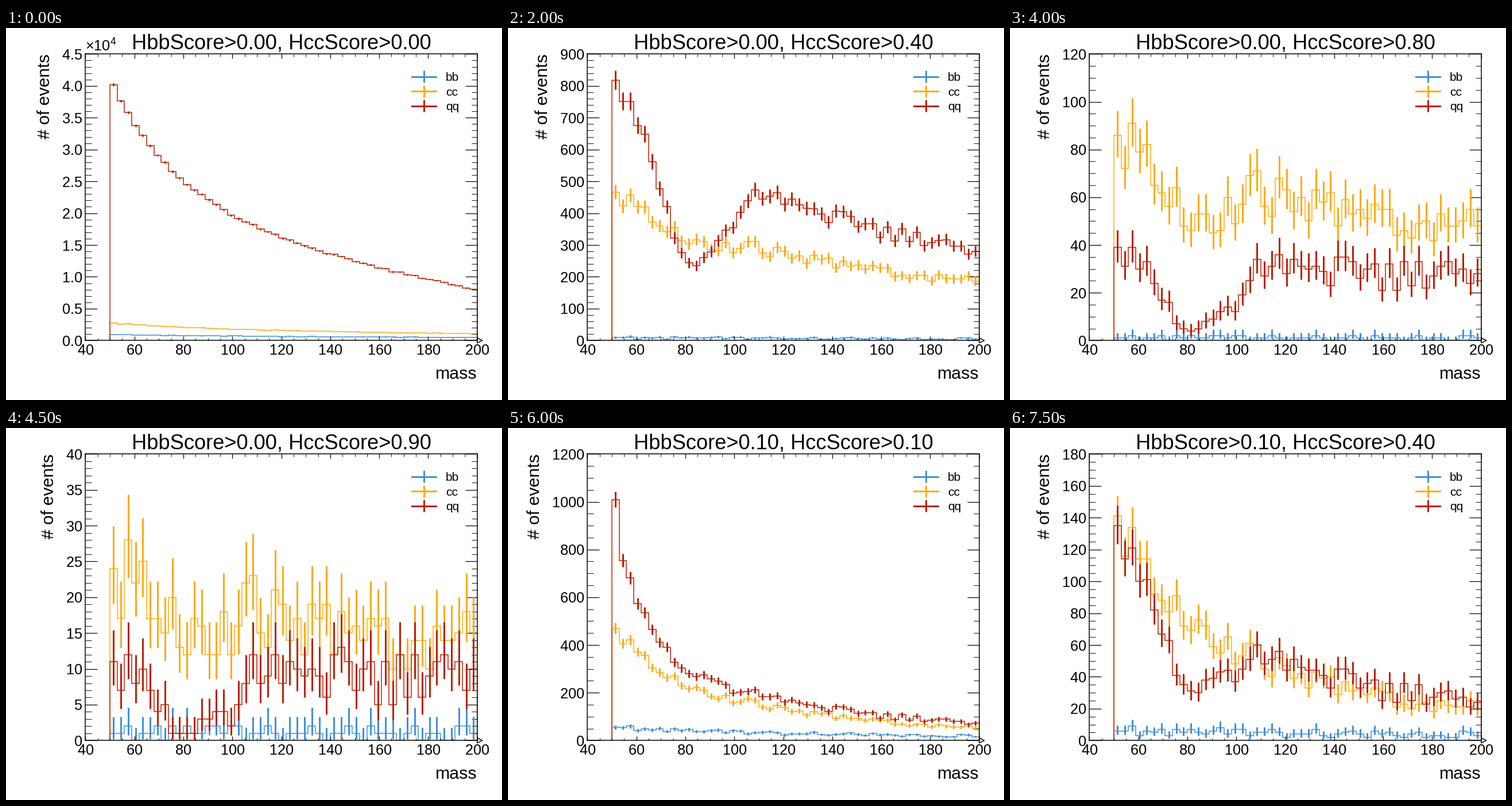
Recreate the animation shown at these times as a matplotlib script. Size 864 px wide and 648 px high, loop 8000 ms.

```python
import numpy as np
import matplotlib.pyplot as plt
from matplotlib.animation import FuncAnimation
from matplotlib.lines import Line2D
from matplotlib.patches import Polygon
from matplotlib.ticker import MaxNLocator, MultipleLocator
from matplotlib.transforms import IdentityTransform

W, H, DPI = 864, 648, 108
NBINS = 50
STEPS = 16
EDGES = np.linspace(50, 200, NBINS + 1)
MIDS = (EDGES[1:] + EDGES[:-1]) / 2
COLORS = {"bb": "#3f90da", "cc": "#ffa90e", "qq": "#bd1f01"}

plt.rcParams.update({
    "font.family": "Liberation Sans", "font.size": 14,
    "mathtext.fontset": "custom", "mathtext.rm": "Liberation Sans",
    "mathtext.default": "regular",
    "axes.labelsize": "x-large", "axes.titlesize": "xx-large",
    "axes.labelpad": 10, "axes.linewidth": 1,
    "axes.formatter.limits": [-2, 4], "axes.formatter.use_mathtext": True,
    "xtick.labelsize": "large", "ytick.labelsize": "large",
    "xtick.direction": "in", "ytick.direction": "in",
    "xtick.top": True, "ytick.right": True,
    "xtick.minor.visible": True, "ytick.minor.visible": True,
    "xtick.major.size": 5, "xtick.minor.size": 3,
    "ytick.major.size": 14, "ytick.minor.size": 7,
})

# Mass spectrum: a power law with a late cutoff, and a dip the cuts carve out.
LOG_MASS = np.log(MIDS / MIDS[0])
FALL = 1.07 * LOG_MASS + 0.0156 * LOG_MASS ** 8
DIP = np.exp(-0.5 * ((MIDS - 84.2) / 10.2) ** 2)

# (first-bin content, slope, power of the fall, dip depth) at each known cut
OPEN = {
    "bb": {0: (950, 0.45, 1, 0), 0.4: (9, 0.4, 1, 0), 0.8: (1, 0.1, 1, 0)},
    "cc": {0: (2750, 0.6, 1, 0), 0.4: (466, 0.58, 1, 0.15),
           0.6: (237, 0.5, 1, 0.25), 0.8: (86, 0.38, 1, 0.45), 0.9: (24, 0.35, 1, 0.5)},
    "qq": {0: (40200, 1, 1, 0), 0.4: (822, 0.69, 1, 0.87),
           0.6: (229, 0.48, 1, 1.25), 0.8: (39, 0.28, 1, 1.9), 0.9: (11, 0.2, 1, 2)},
}
TIGHT = {
    "bb": {0: (480, 0.6, 1, 0), 0.1: (55, 0.7, 1, 0), 0.4: (6, 0.4, 1, 0)},
    "cc": {0: (750, 1.4, 1, 0), 0.1: (470, 1.38, 1, 0.1), 0.4: (141, 1.25, 1, 0.1)},
    "qq": {0: (1600, 1.9, 0.72, 0), 0.1: (1010, 1.92, 0.72, 0.1), 0.4: (136, 1.15, 1, 0.85)},
}

# One scatter per class, as tighter cuts keep part of the same events.
SCATTER = np.random.default_rng(4).uniform(-1.4, 1.4, (len(COLORS), NBINS))
SCATTER[:, 0] = 0
SCATTER = dict(zip(COLORS, SCATTER))


def counts(k, name):
    """Bin contents of one class at step k of the scan."""
    cut = k % 11 / 10
    if cut == 1:
        return np.zeros(NBINS)
    keys = (TIGHT if k > 10 else OPEN)[name]
    warped = np.power(list(keys), 0.45)
    first, slope, power, depth = np.transpose(list(keys.values()))

    def at_cut(values):
        return np.interp(cut ** 0.45, warped, values)

    mean = np.exp(at_cut(np.log(first)) - at_cut(slope) * FALL ** at_cut(power)
                  - at_cut(depth) * DIP)
    return np.maximum(np.round(mean + SCATTER[name] * np.sqrt(mean)), 0)


def poisson_errors(n):
    m = np.maximum(n, 1)
    low = np.where(n > 0, m * (1 - 1 / (9 * m) - 1 / (3 * np.sqrt(m))) ** 3, 0)
    u = n + 1
    high = u * (1 - 1 / (9 * u) + 1 / (3 * np.sqrt(u))) ** 3
    return np.array([n - low, high - n])


fig = plt.figure(figsize=(W / DPI, H / DPI), dpi=DPI, facecolor="white")
ax = fig.add_axes([0.16, 0.16, 0.79, 0.77])
PX = IdentityTransform()


def add_legend():
    for row, (name, color) in enumerate(COLORS.items()):
        y = H - 84.5 - 25.5 * row
        fig.add_artist(Line2D([707.2, 749.2], [y, y], color=color, lw=2,
                              solid_capstyle="projecting", transform=PX))
        fig.add_artist(Line2D([728.2, 728.2], [y - 10.5, y + 10.5], color=color,
                              lw=2, solid_capstyle="butt", transform=PX))
        fig.text(766 / W, (y - 7.5) / H, name)


add_legend()
AX_RIGHT, AX_BOTTOM = 0.95 * W, 0.16 * H
overflow = fig.add_artist(Polygon(
    [(AX_RIGHT, AX_BOTTOM + 4.5), (AX_RIGHT + 9, AX_BOTTOM), (AX_RIGHT, AX_BOTTOM - 4.5)],
    closed=True, fill=False, ec="black", lw=1, transform=PX))


def draw(k):
    ax.clear()
    top = 0
    for name, color in COLORS.items():
        n = counts(k, name)
        ax.stairs(n, EDGES, color=color, lw=1)
        if n.any():
            err = poisson_errors(n)
            ax.errorbar(MIDS, n, yerr=err, fmt="none", ecolor=color, elinewidth=2)
            top = max(top, (n + err[1]).max())

    locator = MaxNLocator(9, steps=[1, 2, 2.5, 5, 10])
    span = (0, 1.05 * top) if top else (-0.055, 0.055)
    ticks = locator.tick_values(*span)
    ax.yaxis.set_major_locator(locator)
    ax.xaxis.set_major_locator(MultipleLocator(20))
    ax.set_xlim(40, 200)
    ax.set_ylim(ticks[0], ticks[-1])
    ax.set_xlabel("mass", loc="right")
    ax.set_ylabel("# of events", loc="top")
    ax.set_title(f"HbbScore>{k // 11 / 10:.2f}, HccScore>{k % 11 / 10:.2f}", y=1)
    overflow.set_visible(top > 0)
    return []


anim = FuncAnimation(fig, draw, frames=STEPS, init_func=lambda: [],
                     interval=500, repeat=True, repeat_delay=0)
plt.show()
```
